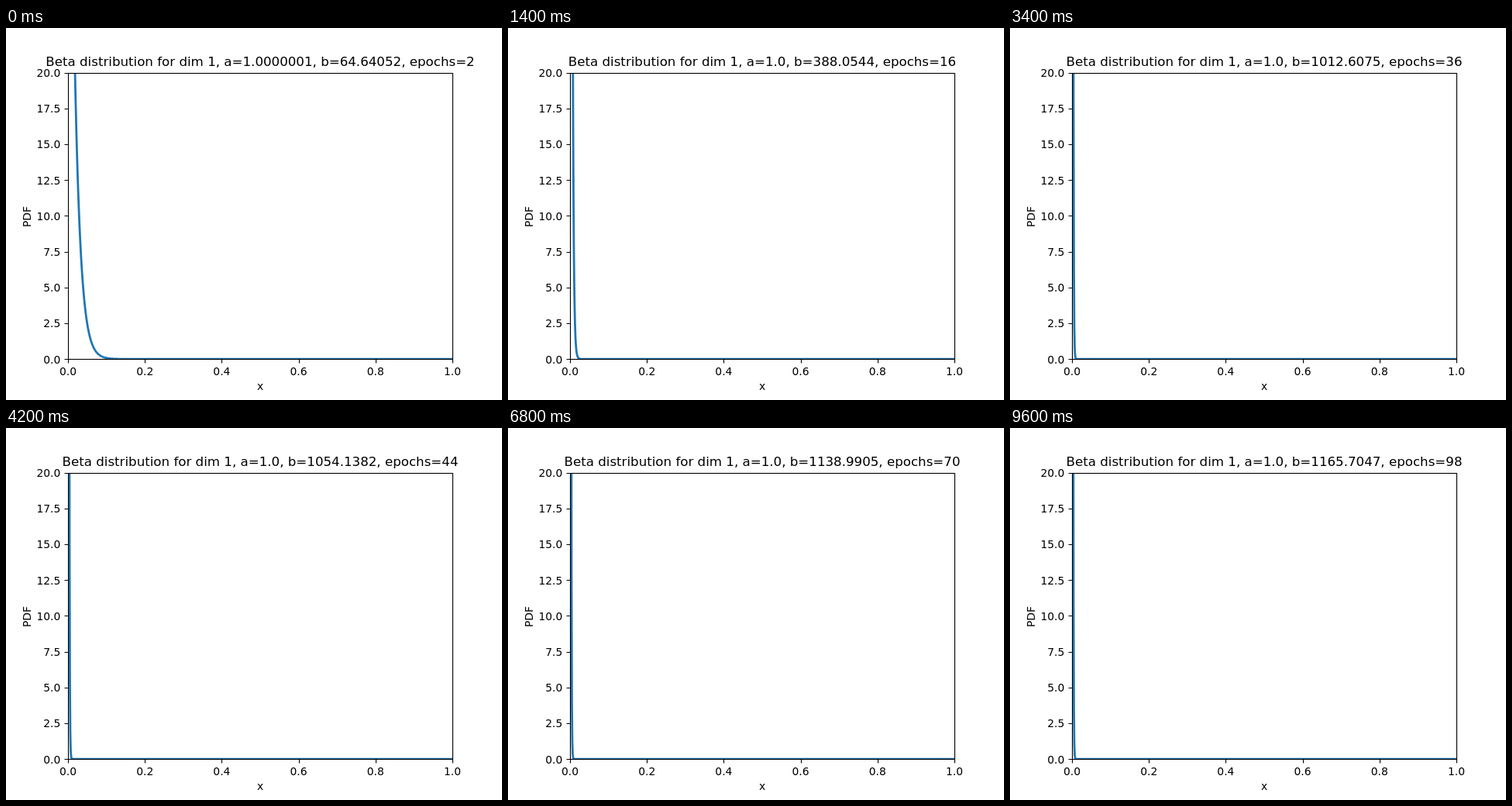
Write an HTML page that moves like this. It is 640x480 px and loops after 9800 ms.

```html
<!DOCTYPE html>
<html lang="en">
<head>
<meta charset="utf-8">
<title>Beta distribution</title>
<style>
  html, body { margin: 0; width: 100%; height: 100%; overflow: hidden; background: #fff; }
  svg { display: block; }
  text { font: 13.889px "DejaVu Sans", sans-serif; }
  #title { font-size: 16.667px; }
  .axis { fill: none; stroke: #000; stroke-width: 1.11; }
  #curve { fill: none; stroke: #1f77b4; stroke-width: 2.78; stroke-linejoin: round; }
</style>
</head>
<body>
<svg width="640" height="480" viewBox="0 0 640 480">
  <clipPath id="plot"><rect x="80" y="58" width="496" height="370"/></clipPath>
  <path id="curve" clip-path="url(#plot)"/>
  <path id="ticks" class="axis"/>
  <rect class="axis" x="80.5" y="58.5" width="496" height="369"/>
  <g id="labels"></g>
  <text x="328" y="467" text-anchor="middle">x</text>
  <text transform="translate(31.5 243.5) rotate(-90)" text-anchor="middle">PDF</text>
  <text id="title" x="328" y="49" text-anchor="middle"></text>
</svg>
<script>
const STEP = 200, STEPS = 49, SAMPLES = 1000;
const $ = id => document.getElementById(id);
const px = x => 80 + 496 * x;
const py = y => 427.2 - 369.6 * y / 20;
const snap = v => Math.round(v) + 0.5;

// Learned b by epoch, joined by a monotone cubic
const knots = [[2, 64.64052], [16, 388.0544], [36, 1012.6075], [52, 1080.5038],
               [70, 1138.9905], [84, 1158.4626], [98, 1165.7047]];
const secants = knots.slice(1).map(([e, b], i) => (b - knots[i][1]) / (e - knots[i][0]));
const slopes = knots.map((_, i) => {
  const l = secants[i - 1] ?? secants[i], r = secants[i] ?? l;
  return 2 * l * r / (l + r);
});

function betaAt(epoch) {
  const i = Math.max(0, knots.findIndex(k => k[0] >= epoch) - 1);
  const [e0, b0] = knots[i], [e1, b1] = knots[i + 1];
  const h = e1 - e0, t = (epoch - e0) / h, u = 1 - t;
  return b0 * (1 + 2 * t) * u * u + b1 * t * t * (3 - 2 * t)
       + h * t * u * (slopes[i] * u - slopes[i + 1] * t);
}

// Shortest decimal that identifies a 32-bit float
function float32Text(value) {
  const f = Math.fround(value);
  for (let digits = 6; digits < 9; digits++) {
    const s = String(+f.toPrecision(digits));
    if (Math.fround(s) === f) return s;
  }
  return String(+f.toPrecision(9));
}

function drawAxes() {
  let ticks = "", labels = "";
  for (let i = 0; i <= 5; i++) {
    const x = px(i / 5);
    ticks += `M${snap(x)} 427.5v5`;
    labels += `<text x="${x}" y="448" text-anchor="middle">${(i / 5).toFixed(1)}</text>`;
  }
  for (let i = 0; i <= 8; i++) {
    const y = py(i * 2.5);
    ticks += `M80.5 ${snap(y)}h-5`;
    labels += `<text x="70.3" y="${Math.round(y + 5.3)}" text-anchor="end">${(i * 2.5).toFixed(1)}</text>`;
  }
  $("ticks").setAttribute("d", ticks);
  $("labels").innerHTML = labels;
}

function drawStep(step) {
  const epoch = 2 + 2 * step, b = betaAt(epoch);
  const points = Array.from({ length: SAMPLES }, (_, i) => {
    const x = i / (SAMPLES - 1);
    return px(x).toFixed(2) + " " + py(b * (1 - x) ** (b - 1)).toFixed(2);
  });
  $("curve").setAttribute("d", "M" + points.join("L"));
  const a = step ? "1.0" : "1.0000001";
  $("title").textContent =
    `Beta distribution for dim 1, a=${a}, b=${float32Text(b)}, epochs=${epoch}`;
}

let shown = -1;
function tick() {
  const step = Math.floor(performance.now() / STEP) % STEPS;
  if (step !== shown) drawStep(shown = step);
  requestAnimationFrame(tick);
}

drawAxes();
tick();
</script>
</body>
</html>
```
